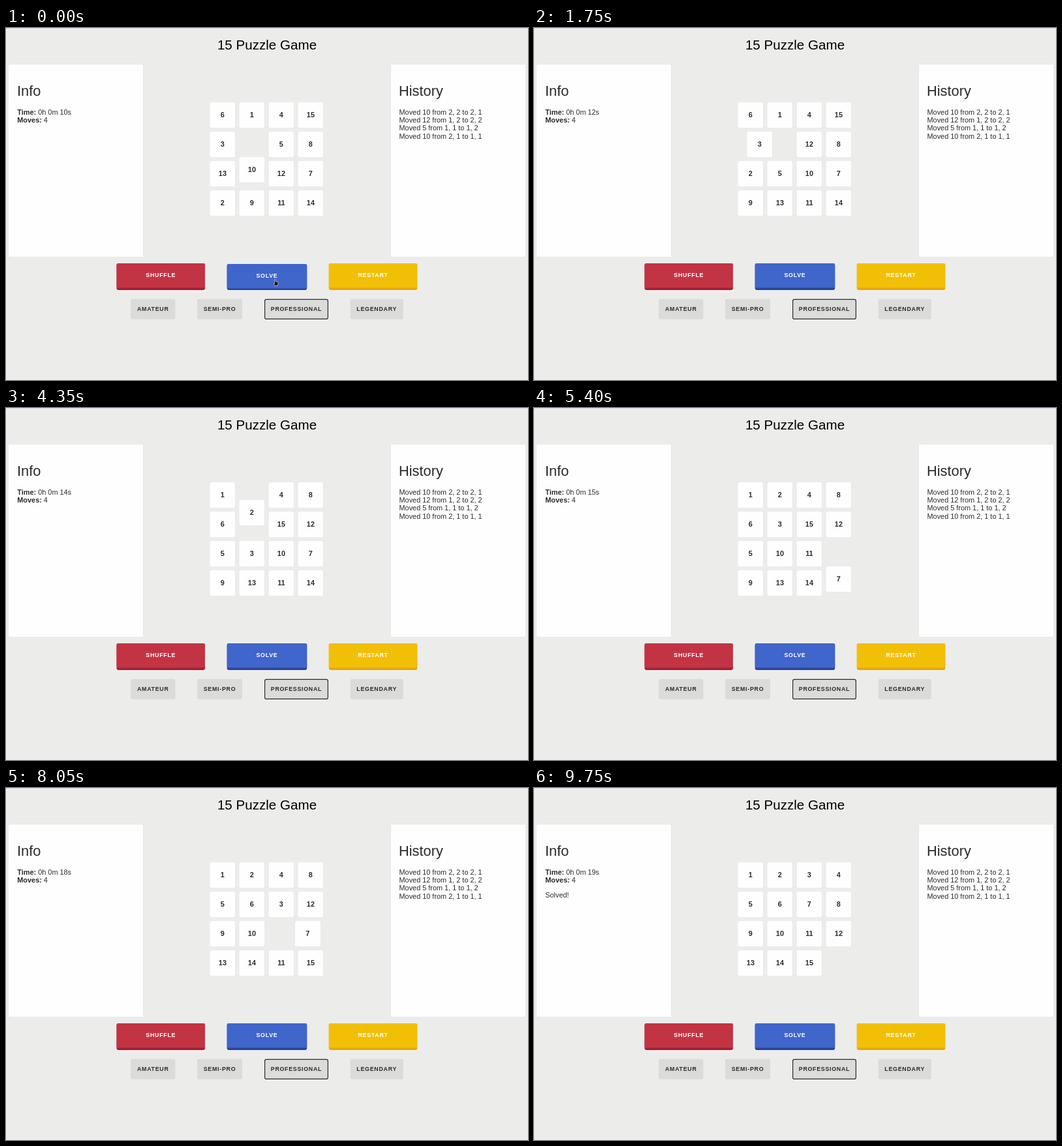
Animation of 800x540 px, one loop 10000 ms. Source, as an HTML page:

```html
<!DOCTYPE html>
<html lang="en">
<head>
<meta charset="utf-8">
<title>15 Puzzle Game</title>
<style>
  html, body { margin: 0; width: 100%; height: 100%; overflow: hidden; background: #ececeb; }
  svg { display: block; width: 800px; height: 540px; font: 10.9px "Liberation Sans", Arial, sans-serif; fill: #2b2b2b; }
  .title { font-size: 20.6px; fill: #000; }
  .head { font-size: 21.8px; }
  .mid { text-anchor: middle; }
  .bold, .tile, .label { font-weight: bold; }
  .label { font-size: 8.9px; letter-spacing: .7px; text-anchor: middle; }
  .tile { text-anchor: middle; }
  .card { fill: #fefefe; filter: drop-shadow(0 .8px .7px rgba(0, 0, 0, .22)); }
</style>
</head>
<body>
<svg viewBox="0 0 800 540">
  <rect width="800" height="1" fill="#d9d9ea"/>
  <text class="title mid" x="400" y="33">15 Puzzle Game</text>

  <rect class="card" x="4" y="55.6" width="206.5" height="296" rx="2.5"/>
  <text class="head" x="17" y="103.6">Info</text>
  <text x="17.3" y="132.6"><tspan class="bold">Time:</tspan> 0h 0m <tspan id="sec">10</tspan>s</text>
  <text x="17.3" y="145"><tspan class="bold">Moves:</tspan> 4</text>
  <text id="done" x="17.3" y="168">Solved!</text>

  <rect class="card" x="589.5" y="55.6" width="207" height="296" rx="2.5"/>
  <text class="head" x="602" y="103.6">History</text>
  <g id="history"></g>
  <g id="tiles"></g>
  <g id="buttons"></g>
  <path id="hand" fill="#111" stroke="#fff" stroke-width=".6"
    d="M411.6 385.6q1-.8 1.6.2v3l3 .8q1.2.4 1 1.8l-.6 2.4-.6 1.8h-3.6l-2-3.6q0-1 1.2-.6z"/>
  <path id="arrow" fill="#111" stroke="#fff" stroke-width=".6" d="M0 0v10l2.4-2.2 1.6 3.6 1.5-.7-1.6-3.4h3.2z"/>
</svg>
<script>
const LOOP = 10000, STEP = 200, PITCH = 45;
const START = [6, 1, 4, 15, 3, 10, 5, 8, 13, 0, 12, 7, 2, 9, 11, 14];
const MOVES = ('10 5 12 10 13 2 9 13 5 3 2 5 3 2 6 1 4 15 8 12 15 4 2 3 10 ' +
  '11 14 7 11 15 3 6 5 9 13 14 15 11 7 15 11 7 12 8 4 3 7 11 15').split(' ').map(Number);
const $ = id => document.getElementById(id);
const show = (el, on) => el.setAttribute('visibility', on ? 'visible' : 'hidden');

$('history').innerHTML = ['10 from 2, 2 to 2, 1', '12 from 1, 2 to 2, 2', '5 from 1, 1 to 1, 2', '10 from 2, 1 to 1, 1']
  .map((s, i) => `<text x="602.5" y="${132.6 + i * 12.4}">Moved ${s}</text>`).join('');

function bigButton(name, x, w, face, edge) {
  return `<g id="${name}"><rect x="${x}" y="361" width="${w}" height="41" rx="3" fill="${edge}"/>
    <rect class="face" x="${x}" y="361" width="${w}" height="37.5" rx="2.5" fill="${face}"/>
    <text class="label" x="${x + w / 2}" y="382.2" fill="#fff">${name}</text></g>`;
}
function levelButton(name, x, w, active) {
  const box = active
    ? `x="${x + .6}" y="416.4" width="${w - 1.2}" height="30" stroke="#2b2b2b" stroke-width="1.2"`
    : `x="${x}" y="415.8" width="${w}" height="31"`;
  return `<rect ${box} rx="2.5" fill="#dbdbda"/>
    <text class="label" x="${x + w / 2}" y="434.1">${name}</text>`;
}
$('buttons').innerHTML =
  bigButton('SHUFFLE', 169.5, 135.5, '#c23444', '#a32030') +
  bigButton('SOLVE', 338.7, 122.5, '#4065cb', '#27479a') +
  bigButton('RESTART', 494.8, 135.5, '#f2bf07', '#e5a70c') +
  levelButton('AMATEUR', 191, 68.5) +
  levelButton('SEMI-PRO', 293, 69) +
  levelButton('PROFESSIONAL', 396, 98, true) +
  levelButton('LEGENDARY', 527.7, 81);

const tiles = START.map((_, n) => {
  if (!n) return null;
  const g = document.createElementNS('http://www.w3.org/2000/svg', 'g');
  g.innerHTML = `<rect class="card" width="39.4" height="39.2" rx="2.2"/><text class="tile" x="19.7" y="23.4">${n}</text>`;
  return $('tiles').appendChild(g);
});

// The board is refreshed three times per move, then held.
function progress(t, u) {
  if (u < 100) return .1;
  if (u < 150) return t < 3500 ? .31 : .4;
  return .87;
}

function drawBoard(t) {
  const clock = t + 150, now = Math.floor(clock / STEP);
  const board = START.slice();
  let moving = 0, from = 0, to = 0;
  MOVES.slice(0, now + 1).forEach((n, i) => {
    const a = board.indexOf(n), b = board.indexOf(0);
    board[a] = 0;
    board[b] = n;
    if (i === now) [moving, from, to] = [n, a, b];
  });
  const p = progress(t, clock % STEP);
  board.forEach((n, cell) => {
    if (!n) return;
    let x = cell % 4, y = cell >> 2;
    if (n === moving) {
      x = from % 4 + (to % 4 - from % 4) * p;
      y = (from >> 2) + ((to >> 2) - (from >> 2)) * p;
    }
    tiles[n].setAttribute('transform', `translate(${312.2 + x * PITCH} ${113.9 + y * PITCH})`);
  });
}

const PATH = [[150, 414, 394], [300, 438, 464], [450, 590, 516], [550, 755, 519]];
function drawCursor(t) {
  const pressed = t < 150, rects = $('SOLVE').querySelectorAll('rect');
  rects[0].setAttribute('y', pressed ? 362 : 361);
  rects[0].setAttribute('height', pressed ? 40 : 41);
  rects[1].setAttribute('y', pressed ? 362 : 361);
  $('SOLVE').querySelector('text').setAttribute('y', pressed ? 383.2 : 382.2);
  show($('hand'), pressed);
  const s = Math.floor(t / 50) * 50;
  const i = PATH.findIndex((k, j) => j && s >= PATH[j - 1][0] && s < k[0]);
  show($('arrow'), i > 0);
  if (i < 1) return;
  const [t0, x0, y0] = PATH[i - 1], [t1, x1, y1] = PATH[i];
  const p = (s - t0) / (t1 - t0);
  $('arrow').setAttribute('transform', `translate(${x0 + (x1 - x0) * p} ${y0 + (y1 - y0) * p})`);
}

function frame() {
  const t = performance.now() % LOOP;
  drawBoard(t);
  drawCursor(t);
  $('sec').textContent = Math.min(19, 10 + Math.floor((t + 400) / 1000));
  show($('done'), t >= 9450);
  requestAnimationFrame(frame);
}
frame();
</script>
</body>
</html>
```
